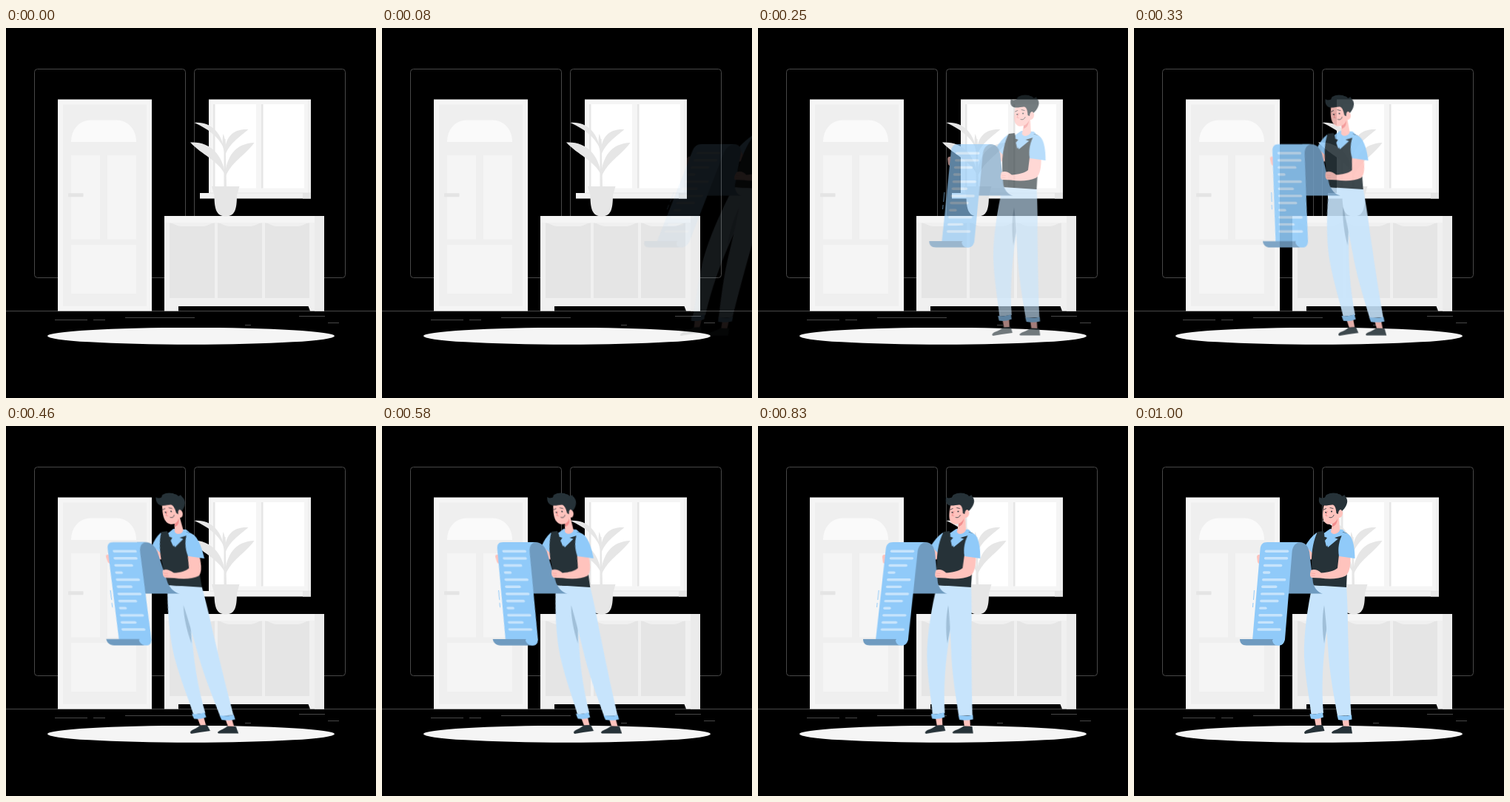
An HTML page for the animation above (1.04 s loop, 500x500 px).

```html
<!DOCTYPE html>
<html lang="en">
<head>
<meta charset="utf-8">
<title>Reading a long list</title>
<style>
  html, body { margin: 0; width: 100%; height: 100%; overflow: hidden; background: #000; }
  svg { display: block; width: 100%; height: 100%; }
  #man { transform-origin: 250px 250px; opacity: 0; }
  .thin { fill: none; stroke: #484848; stroke-width: 1; }
  .skin { fill: #ffc3bd; }
  .dark { fill: #263238; }
  .blue { fill: #90caf9; }
  .shade { fill: #6f9bc0; }
  .pants { fill: #c7e4fc; }
  .ink { fill: none; stroke: #263238; stroke-linecap: round; stroke-width: .8; }
</style>
</head>
<body>
<svg viewBox="0 0 500 500">
  <!-- room -->
  <g class="thin">
    <rect x="38.5" y="55.5" width="204" height="282" rx="4"/>
    <rect x="254.5" y="55.5" width="204" height="282" rx="4"/>
    <path d="M0 382.5H500M66 394.5H110M118 394.5H134M161 391.5H255M323 401.5H331M396 389.5H431M435 398.5H450"/>
  </g>
  <ellipse cx="250" cy="416.3" rx="194" ry="11.4" fill="#f5f5f5"/>

  <!-- door -->
  <path fill="#f5f5f5" d="M70 96.5H197V382.5H70Z"/>
  <path fill="#efefef" d="M77 103.500H190V376H77Z"/>
  <path fill="#fafafa" d="M88 154C88 137 99 124.500 115 124.500H149C165 124.500 176 137 176 154Z"/>
  <path fill="#f5f5f5" d="M88 172H127V285.500H88ZM137 172H176V285.500H137ZM88 293H176V359H88Z"/>
  <rect x="84" y="223.300" width="20.500" height="5" rx="1" fill="#e4e4e4"/>

  <!-- window -->
  <path fill="#f5f5f5" d="M274 96.500H412V223H274Z"/>
  <path fill="#efefef" d="M408 98H412V223H408Z"/>
  <path fill="#fff" d="M281 103H338V216.500H281ZM346 103H403V216.500H346Z"/>
  <path fill="#e6e6e6" d="M280 103H282.500V216.500H280ZM345 103H347.500V216.500H345Z"/>
  <path fill="#f2f2f2" d="M262 223H412V230.500H262Z"/>
  <path fill="#e6e6e6" d="M401 223H412V230.500H401Z"/>
  <path fill="none" stroke="#dedede" stroke-width=".7" d="M274 223H412"/>

  <!-- cabinet -->
  <path fill="#f0f0f0" d="M214 254H430V382.500H411L408.500 376H233V382.500H214Z"/>
  <path fill="#f5f5f5" d="M214 254H417V263H214Z"/>
  <path fill="#ebebeb" d="M417 254H430V382.500H417Z"/>
  <g id="fronts" fill="#e5e5e5"></g>

  <!-- plant -->
  <g fill="#e6e6e6">
    <path d="M278 214H315.500L312 226C312 246 309 254.500 297 254.500C285 254.500 281.500 246 281.500 226Z"/>
    <path d="M294.500 150H296.500L298 214H294.500Z"/>
    <path d="M254.500 128C276 126 291 141 294.500 163C287 146 272 136 254.500 128Z"/>
    <path d="M327.500 137C307 136 295 146 295 175C301 156 314 149 327.500 137Z"/>
    <path d="M249 154.500C276 153 293 171 296.500 199C286 178 265 172 249 154.500Z"/>
    <path d="M335.500 155C311 156 297 172 295.500 204C304 180 322 174 335.500 155Z"/>
    <path d="M293.500 143C291.500 154 293 163 296 170C297.500 160 296.500 150 293.500 143Z"/>
  </g>

  <g id="man">
    <!-- feet -->
    <path class="skin" d="M243.500 393H252.500L253.500 406H246ZM281 394H290L291 407H283Z"/>
    <path class="dark" d="M230 414.500C231 410 240 410 245 404.500L255 404L257.500 412L243 414L231 416ZM267 414.500C268 411 277 410 282 405.500L293.500 406L295 415.500H268Z"/>

    <!-- trousers -->
    <path class="pants" d="M241 215C235 243 229 281 230 312C232 345 237 367 239.500 390L256 388C253 352 255 318 260 282L272 217Z"/>
    <path fill="#a0bfd8" d="M257 242C254 257 254 276 257 294L263 258Z"/>
    <path class="pants" d="M254 216C257 240 260 265 262 298C264 335 270 363 275 392L293.500 391C291 350 290 306 289 272C289 250 288 230 287 216Z"/>
    <path class="blue" d="M237.500 389C243 390 250 389 255 387L256 393.500C250 396 244 396.500 239 395.500ZM274.500 391C281 392 288 392 294 390.500L294.500 396.500C288 398 281 398 276 397Z"/>

    <!-- far arm -->
    <path class="skin" d="M231 160L244 172L239 181L230 170Z"/>
    <path class="blue" d="M247 144C240 149 235 156 232 161C236 167 240 171 244 174L252 160Z"/>
    <path class="skin" d="M173 174C168 173 166 174 166 177L167 184C168 186 170 187 172 186Z"/>

    <!-- torso -->
    <path class="blue" d="M255 146L265 139L282 140L290 148L284 165L258 166Z"/>
    <path class="dark" d="M248 143L256 142L262 164L280 149L282 143L288 145C291 151 291 160 289 172L287 218L241 215L240 182C240 168 243 153 248 143Z"/>
    <path class="blue" d="M258 145L265 141L268 150L278 142L284 144L280 153L270 151L260 163L257 151Z"/>
    <path class="dark" d="M253 148L261 151L258 155ZM271 151L281 148L279 154Z"/>

    <!-- head -->
    <path class="skin" d="M257 105C255 115 254 124 257 129C260 134 265 133 268 132L266 143C268 148 276 146 278 141L277 124C283 124 284 113 278 112L273 105Z"/>
    <path fill="#f28f8f" d="M268 132C271 131 274 128 275 125C275 131 272 135 268 136Z"/>
    <path class="dark" d="M250.500 96C248.500 102 251 107 256 107.500C261 108 266 106 269 106.500C272 108 273 112 273.500 118L276 119C276 113 280 111 281 115C286 111 289 104 288 100C287.500 96 284 95 285 93L281 95C279 91 276 93 275 91C270 90 265 90 260 93C258 95 259 97 256 97C253 98 252 97 250.500 96Z"/>
    <circle class="dark" cx="259.200" cy="116.800" r="1"/>
    <circle class="dark" cx="267" cy="115.500" r="1"/>
    <path class="ink" d="M256.500 113L259.500 111.500M265 110.500L269 111.500M264 123.500C267 124.500 269 123 270 120.500"/>
    <path fill="none" stroke="#f28f8f" d="M261.500 115C260 118 259.500 120 259 121L261.500 121.500"/>

    <!-- paper -->
    <path class="shade" d="M212 157H224C231 157 235 162 237 170L242 212C244 219 248 225 255 226.500H206Z"/>
    <path class="blue" d="M180 157H224C217 158 214 164 213.500 171L204 288C203 294 200 296.500 195 296.500L160 290L170.500 167C171 160 174 157 180 157Z"/>
    <path class="shade" d="M143 288H188C187 293 190 296.500 196 296.500H152C146 296.500 143 293 143 288Z"/>
    <path class="blue" d="M187 289C191 287 198 287 204 286C203 294 200 296.500 195 296.500C190 296.500 187 293 187 289Z"/>
    <path fill="none" stroke="#90caf9" d="M162.500 222L161.500 235M161 239L160.500 245"/>
    <g id="rows" stroke="#c7e4fc" stroke-width="3.400" stroke-linecap="round"></g>

    <!-- near arm -->
    <path class="skin" d="M277 174L292.500 176C293 188 291 199 286 202.500C277 207 263 207 252 205.500L240 205C237 203 238 199 239 195C243 193 248 194 253 198.500C262 198 270 196 275 192Z"/>
    <path fill="none" stroke="#f28f8f" stroke-width=".5" d="M239.500 199L245 199.500M239.500 202L244.500 202.500"/>
    <path class="blue" d="M283 144C293 144 298 155 298.500 179L277 176C275 165 277 154 283 144Z"/>
  </g>
</svg>
<script>
const $ = id => document.getElementById(id);

$('fronts').innerHTML = [[221, 282], [286, 346], [350, 410]].map(([a, b]) =>
  `<path d="M${a} 263.500C${a + 6} 263.500 ${a + 9} 268 ${a + 16} 268H${b - 16}C${b - 9} 268 ${b - 6} 263.500 ${b} 263.500V365H${a}Z"/>`).join('');

$('rows').innerHTML = [32, 32, 25, 10, 32, 21, 32, 25, 10, 32, 21, 32].map((w, i) => {
  const x = 178.5 - i * 0.95, y = 169.2 + i * 9.62;
  return `<path d="M${x} ${y}h${w - 3}"/>`;
}).join('');

// Cubic bezier (.36, -.01, .5, 1.38), solved by bisection
function ease(x) {
  const curve = (s, a, b) => 3 * (1 - s) ** 2 * s * a + 3 * (1 - s) * s * s * b + s ** 3;
  let lo = 0, hi = 1;
  for (let i = 0; i < 30; i++) {
    const mid = (lo + hi) / 2;
    if (curve(mid, .36, .5) < x) lo = mid; else hi = mid;
  }
  return curve(lo, -.01, 1.38);
}

const LOOP = 1040, FPS = 24, LEAD = 20;
const tan = deg => Math.tan(deg * Math.PI / 180);
const poses = [
  { at: 0, lean: tan(-20), x: 250, alpha: 0 },
  { at: 600, lean: tan(10), x: 0, alpha: 1 },
  { at: 800, lean: tan(-2), x: 0, alpha: 1 },
  { at: 1000, lean: 0, x: 0, alpha: 1 }
];

function poseAt(time) {
  const t = Math.min(time, 1000);
  const i = t < 600 ? 0 : t < 800 ? 1 : 2;
  const a = poses[i], b = poses[i + 1];
  const p = ease((t - a.at) / (b.at - a.at));
  const mix = key => a[key] + (b[key] - a[key]) * p;
  return {
    transform: `matrix(1, 0, ${mix('lean').toFixed(5)}, 1, ${mix('x').toFixed(3)}, 0)`,
    opacity: Math.max(0, Math.min(1, mix('alpha')))
  };
}

// Each step holds until the next, on a 10 ms grid
const steps = Array.from({ length: 25 }, (_, n) => {
  const time = n * 1000 / FPS;
  return { ...poseAt(time + LEAD), offset: Math.round(time / 10) * 10 / LOOP, easing: 'steps(1, end)' };
});
steps.push({ ...poseAt(1000), offset: 1 });
$('man').animate(steps, { duration: LOOP, iterations: Infinity });
</script>
</body>
</html>
```
